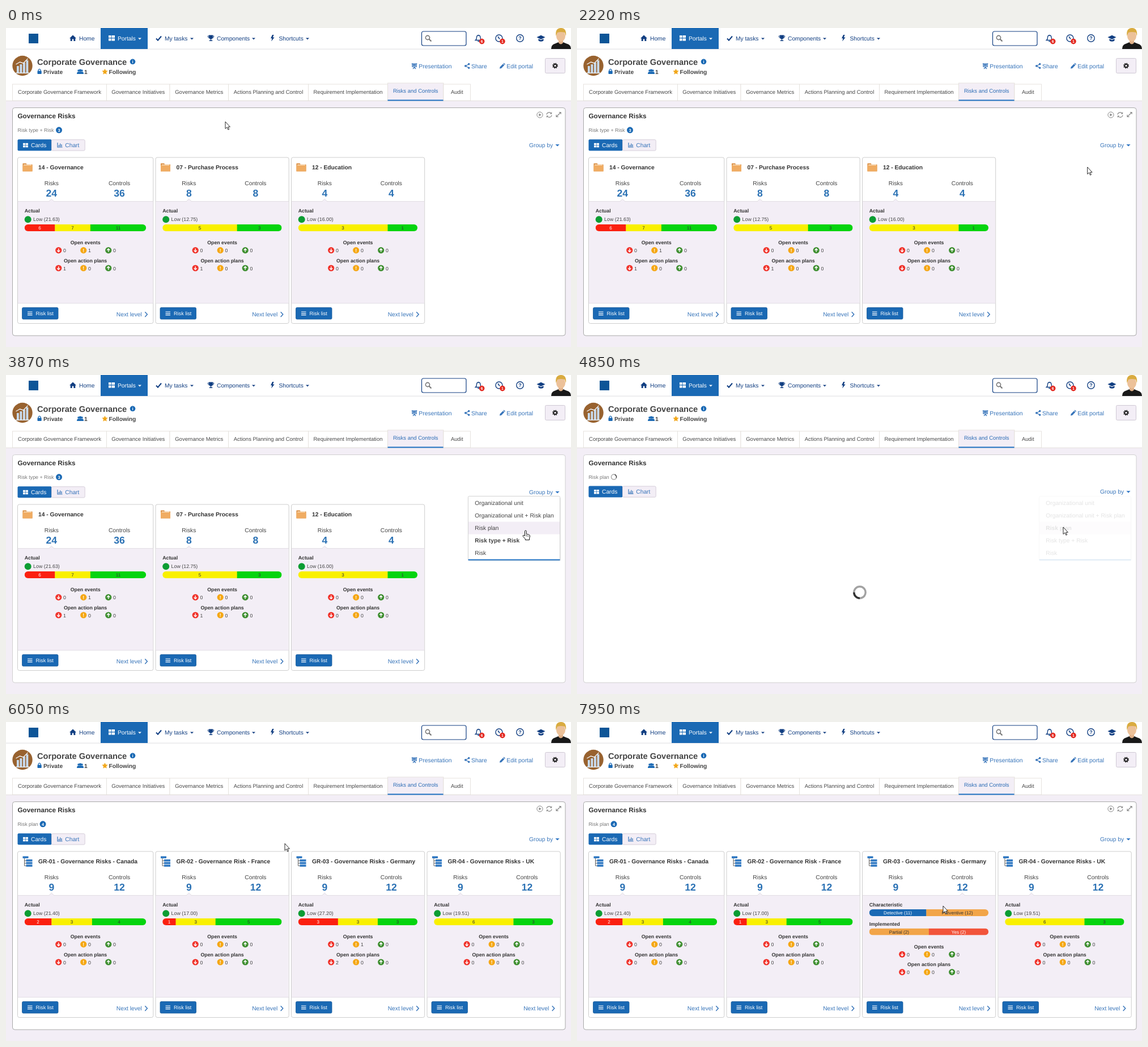
Write an HTML page that moves like this. It is 997 px wide and 562 px high and loops after 8000 ms.

```html
<!DOCTYPE html>
<html lang="en">
<head>
<meta charset="utf-8">
<title>Governance portal</title>
<style>
html, body { margin: 0; width: 100%; height: 100%; overflow: hidden; background: #fff; }
svg { display: block; width: 100%; height: 100%; }
text { font-family: "Liberation Sans", Arial, sans-serif; text-rendering: geometricPrecision; white-space: pre; }
.bar { clip-path: inset(0 round 6px); }
</style>
</head>
<body>
<svg id="stage" viewBox="0 0 997 562"></svg>
<script>
const BLUE = '#1a69b4', LINK = '#3875ba', NAVY = '#123f82', INK = '#333', LILAC = '#f3eef6', EDGE = '#cdcdcd';
const RED = '#fb2010', YELLOW = '#f9f000', GREEN = '#05d40f';
const S = 8.8, M = 9.5, L = 10.25;

// Shape helpers; y of a text is the middle of its capitals.
const text = (s, x, y, size, fill = INK, more = '') =>
  `<text x="${x}" y="${y + size * .36}" font-size="${size}" fill="${fill}" ${more}>${s}</text>`;
const MID = 'text-anchor="middle"', BOLD = 'font-weight="700"', BOTH = MID + ' ' + BOLD;
const rect = (x, y, w, h, fill, more = '') =>
  `<rect x="${x}" y="${y}" width="${w}" height="${h}" fill="${fill}" ${more}/>`;
const disc = (x, y, r, fill, more = '') => `<circle cx="${x}" cy="${y}" r="${r}" fill="${fill}" ${more}/>`;
const path = (d, fill, more = '') => `<path d="${d}" fill="${fill}" ${more}/>`;
const line = (d, color, w = 1, more = '') => path(d, 'none', `stroke="${color}" stroke-width="${w}" ${more}`);
const at = (x, y, body) => `<g transform="translate(${x} ${y})">${body}</g>`;
const group = (id, body) => `<g id="${id}">${body}</g>`;
const caret = (x, y, fill, r = 3) => path(`M${x - r} ${y - r / 2}h${2 * r}l${-r} ${r}z`, fill);
const badge = (x, y, r, fill, s, size) => disc(x, y, r, fill) + text(s, x, y, size, '#fff', BOTH);

function header() {
  let s = rect(0, 0, 997, 37, '#fff') + rect(0, 36.7, 997, .9, '#d9d9de') + rect(40, 10, 17, 17, '#0d5597');
  s += rect(167, 0, 83, 37, BLUE);
  s += path('M112 18.2l6-5.7 6 5.7h-1.7v4.8h-3v-3.4h-2.6v3.4h-3v-4.8z', NAVY);
  s += [[181, 13, 4.5, 4.2], [186.5, 13, 5.5, 4.2], [181, 18.4, 4.5, 4.2], [186.5, 18.4, 5.5, 4.2]]
    .map(b => rect(...b, '#fff')).join('');
  s += line('M265 18.5l3 3.2 6-7.2', NAVY, 2);
  s += path('M358 12.5h7v4q-1 3-3 3.3v1.7h2.2v1.5h-5.4v-1.5h2.2v-1.7q-2-.3-3-3.3z', NAVY)
    + line('M358 14h-1.8q0 3.5 3 4M365 14h1.8q0 3.5-3 4', NAVY);
  s += path('M470 12l-3 6.2h2.4l-1.2 5.3 5.4-7h-2.8l1.8-4.5z', NAVY);
  s += text('Home', 129, 18.3, L, NAVY) + text('Portals', 197, 18.3, L, '#fff')
    + text('My tasks', 280, 18.3, L, NAVY) + text('Components', 372, 18.3, L, NAVY) + text('Shortcuts', 481.5, 18.3, L, NAVY);
  s += caret(236, 19, '#fff') + [328, 437, 532].map(x => caret(x, 19, NAVY)).join('');
  s += rect(733.5, 6, 78.5, 25, '#fff', `rx="3" stroke="${NAVY}" stroke-width="1.2"`);
  s += disc(744, 17, 3.6, 'none', 'stroke="#777" stroke-width="1.6"') + line('M746.7 19.7l3.8 3.8', '#777', 2);
  s += line('M828.5 21.5q2-1.5 2-5 .3-3.6 3.2-3.8 3 .2 3.3 3.8 0 3.5 2 5zM832.3 23.5h3', NAVY, 1.4);
  s += disc(870, 18, 6, 'none', `stroke="${NAVY}" stroke-width="1.4"`) + line('M868 15l3 4.5', NAVY, 1.5);
  s += badge(839.7, 23.6, 4.8, '#e3261d', 6, 7) + badge(876, 23.6, 4.8, '#e3261d', 1, 7);
  s += disc(907, 18, 6.2, 'none', `stroke="${NAVY}" stroke-width="1.4"`) + text('?', 907, 18.2, 9, NAVY, BOTH);
  s += path('M936.5 16.3l7.5-3.6 7.5 3.6-7.5 3.7zM939.5 19l4.5 2.2 4.5-2.2v3.2q-4.5 3.2-9 0z', NAVY);
  s += path('M962 37q0-8 7-9.5l6-2.5h8l6 2.5q8 1.5 8 9.5z', '#191919') + path('M975 18h8v8q-4 5-8 0z', '#e0b088')
    + `<ellipse cx="979" cy="14" rx="8" ry="10" fill="#ecc199"/>` + path('M970.5 14q-2-14 9-14 10 0 8.5 14l-2-6q-7-2-13 0z', '#d9ab3f');
  return s;
}

function portalBar() {
  let s = disc(29, 66.5, 17.7, '#98622f');
  s += [[19, 12], [24.5, 15], [30, 18], [35.5, 22]].map(([x, h]) => rect(x, 79 - h, 3.8, h, '#c9dcf0')).join('')
    + line('M17.5 64l7-4 6 2 8-8', '#f1f4f8', 1.4) + rect(17, 78.5, 24, 1.6, '#dfe7ef');
  s += text('Corporate Governance', 55, 60, 14.6, '#444', BOLD) + badge(223.5, 59.3, 4.8, BLUE, 'i', 7.5);
  s += rect(55.5, 75.6, 7.2, 5.4, BLUE, 'rx=".8"') + line('M57 76v-1.8q2-3.6 4.1 0v1.8', BLUE, 1.3);
  s += [128, 134, 131].map((x, i) => disc(x, i < 2 ? 75 : 74.8, i < 2 ? 1.8 : 2.3, BLUE)
    + path(`M${x - 3} 81q0-4 3-4t3 4z`, BLUE)).join('');
  s += path('M174.5 71.8l1.6 3.3 3.5.5-2.6 2.5.7 3.6-3.2-1.7-3.2 1.7.7-3.6-2.6-2.5 3.5-.5z', '#f2a81d');
  s += text('Private', 66, 77.2, L, '#444', BOLD) + text('1', 138, 77.2, L, '#444', BOLD) + text('Following', 181.5, 77.2, L, '#444', BOLD);
  s += line('M715.8 62.8h9.6M717 63.5v4.6h7.2v-4.6M720.6 68v1.5M718 72l2.6-2.6 2.6 2.6', LINK, 1.3) + rect(718, 64, 5, 2.6, LINK);
  s += line('M817 63.5l-6 3.4 6 3.4', LINK, 1.2) + [[816.7, 63.6], [810.8, 66.9], [816.7, 70.2]].map(p => disc(...p, 1.8, LINK)).join('');
  s += path('M871 71.5l.7-3 5.3-5.3 2.4 2.4-5.3 5.3zM877.6 62.6l1-1 2.4 2.4-1 1z', LINK);
  s += text('Presentation', 728.3, 66.8, 10.4, LINK) + text('Share', 821, 66.8, 10.4, LINK) + text('Edit portal', 883.3, 66.8, 10.4, LINK);
  s += rect(951.5, 53.5, 35, 26, LILAC, 'rx="2" stroke="#cfc8d4"');
  s += disc(969, 66.5, 2.7, 'none', 'stroke="#222" stroke-width="2"')
    + disc(969, 66.5, 4.2, 'none', 'stroke="#222" stroke-width="1.6" stroke-dasharray="1.65 1.65"');
  return s;
}

function tabs() {
  const names = ['Corporate Governance Framework', 'Governance Initiatives', 'Governance Metrics', 'Actions Planning and Control',
    'Requirement Implementation', 'Risks and Controls', 'Audit'];
  const edges = [11.5, 177.5, 289, 392.5, 533.5, 673.5, 772, 819.5];
  let s = rect(0, 128, 997, 434, LILAC) + rect(0, 127.8, 997, .8, '#dfdcd8');
  names.forEach((name, i) => {
    const x = edges[i], w = edges[i + 1] - x, on = i === 5;
    s += rect(x, on ? 97 : 99, w, on ? 31 : 29, on ? LILAC : '#fff', 'stroke="#e4e1dc" stroke-width=".9"');
    if (on) s += rect(x, 126.4, w, 2, '#2272c3');
    s += text(name, x + w / 2, on ? 111 : 113, M, on ? '#2b6cb5' : '#484848', MID);
  });
  return s;
}

const bar = (x, y, w, parts) => {
  const sum = parts.reduce((a, p) => a + p[0], 0);
  let left = x, boxes = '', labels = '';
  for (const [n, fill, label, ink] of parts) {
    const part = w * n / sum;
    if (!n) continue;
    boxes += rect(left, y, part + (left + part < x + w - 1 ? .3 : 0), 12, fill);
    labels += text(label, left + part / 2, y + 6.2, 8.1, ink, MID);
    left += part;
  }
  return `<g class="bar">${boxes}</g>${labels}`;
};

function counters(cx, y, title, counts) {
  const arrow = 'M0 -3V2.6M-2.5 .2L0 2.8 2.5 .2';
  const marks = [line(arrow, '#fff', 1.4), text('!', 0, 0, 8.5, '#fff', BOTH), `<g transform="scale(1 -1)">${line(arrow, '#fff', 1.4)}</g>`];
  return text(title, cx, y, S, INK, BOTH) + ['#f0332b', '#f5a714', '#3f8f31'].map((fill, i) => {
    const x = cx - 47.4 + 44 * i;
    return at(x, y + 13.3, disc(0, 0, 5.6, fill) + marks[i]) + text(counts[i], x + 8.2, y + 13.8, S, '#444');
  }).join('');
}

const CARD_X = [20.5, 264, 503.5, 743];
const notch = (x) => path(`M${x - 4.5} 306l4.5-4.5 4.5 4.5z`, LILAC) + line(`M${x - 4.5} 305.5l4.5-4.3 4.5 4.3`, '#d8d4da', .8);

function riskView(x, w, level, parts, events, plans) {
  const cx = x + w / 2;
  return notch(x + w / 4) + text('Actual', x + 12.2, 322, S, INK, BOLD)
    + disc(x + 18.2, 337.3, 6, '#0c9d33') + text(`Low (${level})`, x + 27.6, 337, 8.85, '#444')
    + bar(x + 12.2, 346, w - 24.8, parts.map((n, i) => [n, [RED, YELLOW, GREEN][i], n, i ? INK : '#fff']))
    + counters(cx, 378.3, 'Open events', events) + counters(cx, 409.7, 'Open action plans', plans);
}

function controlView(x, w) {
  const cx = x + w / 2;
  return notch(x + w * .75) + text('Characteristic', x + 12.2, 322, S, INK, BOLD)
    + bar(x + 12.2, 330, w - 24.8, [[11, BLUE, 'Detective (11)', '#fff'], [12, '#f2a549', 'Preventive (12)', INK]])
    + text('Implemented', x + 12.2, 355.6, S, INK, BOLD)
    + bar(x + 12.2, 363.6, w - 24.8, [[2, '#f2a549', 'Partial (2)', INK], [2, '#f2543b', 'Yes (2)', '#fff']])
    + counters(cx, 396, 'Open events', '000') + counters(cx, 427.3, 'Open action plans', '000');
}

const folder = path('M0 2h6l1.5 2H17v12H0z', '#d98a3a') + path('M0 5.5h17V16H0z', '#f0ac62') + rect(1.5, 4, 14, 1.5, '#fbe3c4');
const tree = line('M3 3v13.8h5M3 8h5M3 12.3h5', '#555', .9)
  + [[0, 0, 10], [6, 5.6, 11], [6, 10.2, 11], [6, 14.8, 11]].map(([x, y, w]) => rect(x, y, w, 3.6, '#2f78c2')).join('');

function card(i, icon, [title, risks, controls, ...view], id) {
  const x = CARD_X[i], w = i ? 235.2 : 239.3;
  let s = rect(x, 228, w, 292.5, '#fff', `rx="3" stroke="${EDGE}"`) + rect(x + .5, 305.5, w - 1, 179.5, LILAC);
  s += rect(x, 305, w, .8, '#dcd8de') + rect(x, 484.6, w, .8, '#dcd8de') + at(x + 9, 236.5, icon);
  s += text(title, x + 36.5, 245.3, L, INK, BOLD);
  [['Risks', risks, .25], ['Controls', controls, .75]].forEach(([name, n, f]) => {
    s += text(name, x + w * f, 273.2, L, '#444', MID) + text(n, x + w * f, 290.8, 17.5, '#2a71b4', BOTH);
  });
  s += id ? group(id + 'Risks', riskView(x, w, ...view)) + group(id + 'Controls', controlView(x, w)) : riskView(x, w, ...view);
  s += rect(x + 8, 492.5, 63.5, 20.5, BLUE, 'rx="2" stroke="#14589a" stroke-width=".8"')
    + line(`M${x + 17.5} 500h8.5m-8.5 2.8h8.5m-8.5 2.8h8.5`, '#fff', 1.2) + text('Risk list', x + 32, 502.8, 9.1, '#fff');
  s += text('Next level', x + w - 65, 504.5, L, LINK) + line(`M${x + w - 14.5} 500.3l4 4.3-4 4.3`, LINK, 1.5);
  return s;
}

const BY_TYPE = [
  ['14 - Governance', 24, 36, '21.63', [6, 7, 11], '010', '100'],
  ['07 - Purchase Process', 8, 8, '12.75', [0, 5, 3], '000', '100'],
  ['12 - Education', 4, 4, '16.00', [0, 3, 1], '000', '000']];
const BY_PLAN = [
  ['GR-01 - Governance Risks - Canada', 9, 12, '21.40', [2, 3, 4], '000', '000'],
  ['GR-02 - Governance Risk - France', 9, 12, '17.00', [1, 3, 5], '000', '000'],
  ['GR-03 - Governance Risks - Germany', 9, 12, '27.20', [3, 3, 3], '010', '200'],
  ['GR-04 - Governance Risks - UK', 9, 12, '19.51', [0, 6, 3], '000', '000']];

function toolbar() {
  return rect(20.5, 196.3, 60, 20, BLUE, 'rx="2"') + rect(80.5, 196.8, 58.7, 19.2, LILAC, 'rx="2" stroke="#d5ced9"')
    + [[30, 202.8], [34.8, 202.8], [30, 206.9], [34.8, 206.9]].map(p => rect(...p, 4.2, 3.4, '#fff')).join('')
    + line('M91 202v8h8.5M93.5 209v-3M95.7 209v-5.5M98 209v-4', LINK, 1.2)
    + text('Cards', 44, 206.5, L, '#fff') + text('Chart', 104.3, 206.5, L, LINK)
    + text('Group by', 923, 206.5, L, LINK) + group('underline', rect(923, 211.3, 42, .8, LINK)) + caret(973, 206.8, '#2c74c4', 3.6);
}

const ITEMS = ['Organizational unit', 'Organizational unit + Risk plan', 'Risk plan', 'Risk type + Risk', 'Risk'];
function menu() {
  return rect(816, 215, 163, 113, '#000', 'opacity=".08" rx="3"') + rect(815.5, 213.5, 162, 112, '#fff', 'rx="2" stroke="#d2d2d2"')
    + rect(815.5, 324.6, 162, 2, '#2272c3') + `<rect id="row" x="816" width="161" height="22" fill="${LILAC}"/>`
    + ITEMS.map((s, i) => text(s, 827.3, 225.7 + 22 * i, L, '#444', `class="item"`)).join('');
}

const spinner = (id, x, y, r, w) => at(x, y, disc(0, 0, r, 'none', `stroke="#a2a2a2" stroke-width="${w}"`)
  + group(id, line(`M${-r} 0A${r} ${r} 0 0 0 0 ${r}`, '#333', w)));

const arrowShape = path('M0 0V12.4L2.9 9.8 4.9 14.2 6.7 13.4 4.8 9.2H8.4Z', '#fff', 'stroke="#111" stroke-width=".9"');
const handShape = path('M-1.4 9.5V1.3Q-1.4 0 0 0T1.4 1.3V6.2L5.8 7.2Q7.6 7.8 7.6 10L6.6 14V16.6H-.6V14.8L-4.6 10.3Q-5.4 8.8-4 8.3-3 8-1.4 9.5Z',
  '#fff', 'stroke="#111" stroke-width="1"') + line('M3 8.5v2M5 9v1.8M1.3 7.5v2.7', '#111', .7);

const panelTools = disc(942, 153, 5.1, 'none', 'stroke="#8a8a8a"') + path('M940.4 150.4l4.4 2.6-4.4 2.6z', '#8a8a8a')
  + line('M954 152.5a4.5 4.5 0 0 1 8-2M963 153.5a4.5 4.5 0 0 1-8 2', '#8a8a8a', 1.2) + path('M963.2 148v3.6h-3.6zM953.8 158v-3.6h3.6z', '#8a8a8a')
  + line('M971.5 156l7-7M975.8 148.5h3.3v3.3M971 152.8v3.7h3.7', '#8a8a8a', 1.2);

const stage = document.getElementById('stage');
stage.innerHTML = rect(0, 0, 997, 562, '#fff') + tabs() + header() + portalBar()
  + `<rect id="panel" x="11.5" y="140.5" width="975.5" height="401.5" rx="4" fill="#fff"/>`
  + text('Governance Risks', 20.5, 155, 11.7, INK, BOLD) + group('tools', panelTools)
  + group('typeLabel', text('Risk type + Risk', 20.5, 180, 8.9, '#777') + badge(93.5, 179.8, 5.5, BLUE, 3, 7.5))
  + group('planLabel', text('Risk plan', 20.5, 179.6, S, '#777') + group('planCount', badge(65, 179.8, 5.5, BLUE, 4, 7.5)))
  + group('bar', toolbar())
  + group('byType', BY_TYPE.map((c, i) => card(i, folder, c)).join(''))
  + group('byPlan', BY_PLAN.map((c, i) => card(i, tree, c, i === 2 ? 'third' : '')).join(''))
  + group('loading', spinner('spin', 499, 383, 10.2, 3.4) + spinner('smallSpin', 65, 179.6, 4.6, 1.3))
  + group('menu', menu()) + group('cursor', group('arrow', arrowShape) + group('hand', handShape));

const el = {};
stage.querySelectorAll('[id]').forEach(n => el[n.id] = n);
const items = stage.querySelectorAll('.item');

// Pointer stops: time, x, y.
const STOPS = [[0, 387, 165], [30, 387, 165], [810, 590, 176], [1390, 728.5, 192.5], [1640, 757, 202], [2050, 855, 258], [2470, 959, 212],
  [2780, 972, 206], [3380, 972, 206], [3720, 930, 262], [3870, 917, 274], [4450, 858, 268], [4850, 858, 268], [5500, 585, 248],
  [5740, 492, 214], [6050, 492, 214], [6730, 655, 300], [7200, 680, 289], [7330, 680, 289], [7520, 668, 318], [7590, 668, 318],
  [7950, 646, 324], [8000, 646, 324]];

function slope(i, k) {
  const a = STOPS[i - 1], b = STOPS[i], c = STOPS[i + 1];
  if (!a || !c || a[1] === b[1] || b[1] === c[1]) return 0;
  return (c[k] - a[k]) / (c[0] - a[0]);
}

function pointer(t) {
  const i = Math.max(0, STOPS.findIndex(s => s[0] > t) - 1);
  const a = STOPS[i], b = STOPS[i + 1], d = b[0] - a[0], u = (t - a[0]) / d, v = 1 - u;
  return [1, 2].map(k => v * v * (1 + 2 * u) * a[k] + u * u * (3 - 2 * u) * b[k]
    + d * u * v * (v * slope(i, k) - u * slope(i + 1, k)));
}

const show = (id, on) => el[id].setAttribute('display', on ? 'inline' : 'none');
const clamp = v => Math.min(1, Math.max(0, v));
const OPEN = 3250, PICK = 4700, LOADED = 5300, SWITCH = 7300;

function draw(t) {
  const [x, y] = pointer(t), wait = t >= PICK && t < LOADED, picked = t >= PICK;
  const hover = t < 3470 || t >= 5000;
  el.panel.setAttribute('stroke', hover ? '#a9a9a9' : '#d0d0d0');
  show('tools', hover);
  show('typeLabel', !picked);
  show('planLabel', picked);
  show('planCount', t >= LOADED);
  show('byType', !picked);
  show('byPlan', t >= LOADED);
  show('thirdRisks', t < SWITCH);
  show('thirdControls', t >= SWITCH);
  show('loading', wait);
  show('underline', t > 2400 && t < 3440);
  el.bar.setAttribute('transform', `translate(0 ${wait ? -.8 : 0})`);
  const turn = `rotate(${(t - 4850) * .36})`;
  el.spin.setAttribute('transform', turn);
  el.smallSpin.setAttribute('transform', turn + ' rotate(200)');

  const fade = picked ? 1 - (t - PICK) / 175 : (t - OPEN) / 100;
  el.menu.setAttribute('opacity', clamp(fade));
  const row = Math.floor((y - 214.5) / 22);
  show('row', x < 977 && row >= 0 && row < 5);
  el.row.setAttribute('y', 214.5 + 22 * row);
  items.forEach((n, i) => n.setAttribute('font-weight', i === (picked ? 2 : 3) ? 700 : 400));

  const link = t > 2400 && t < PICK || t > 6980 && t < 7400;
  show('hand', link);
  show('arrow', !link);
  el.cursor.setAttribute('transform', `translate(${x} ${y})`);
}

function tick() {
  draw(performance.now() % 8000);
  requestAnimationFrame(tick);
}
tick();
</script>
</body>
</html>
```
